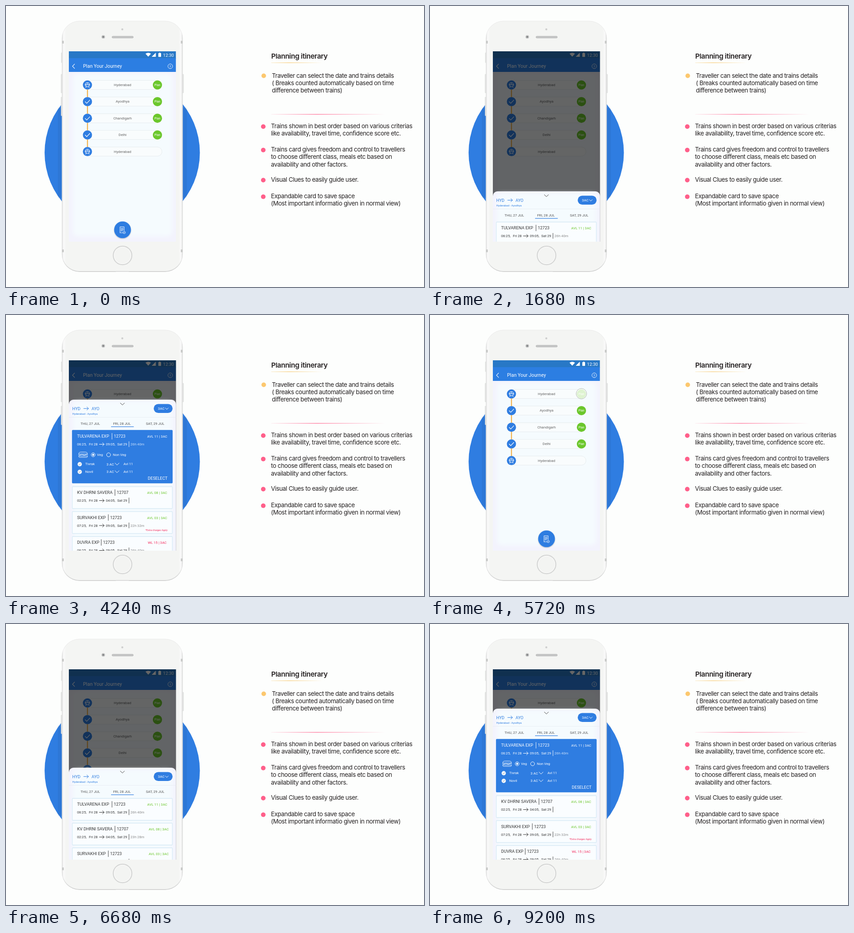
Recreate the animation shown at these times as an HTML page. Size 911x614 px, loop 9920 ms.

```html
<!DOCTYPE html>
<html lang="en">
<head>
<meta charset="utf-8">
<title>Planning itinerary</title>
<style>
html, body { margin: 0; width: 100%; height: 100%; overflow: hidden; background: #fdfefd; }
svg { display: block; width: 911px; height: 614px; font-family: Roboto, sans-serif; }
.copy { font: 13.2px Inter, sans-serif; letter-spacing: -.42px; fill: #231f20; }
.copy .head { font-size: 15.2px; font-weight: 600; letter-spacing: -.35px; }
.line { fill: none; stroke-linecap: round; stroke-linejoin: round; }
#tap1, #tap2, #tap3, #dim, #sheet, #closed, #open, #picked { animation: 4960ms infinite; }
#stage { animation: blink 9920ms step-end infinite; }
#tap1 { animation-name: tap1; }
#tap2 { animation-name: tap2; }
#tap3 { animation-name: tap3; }
#dim { animation-name: dim; }
#sheet { animation-name: sheet; animation-timing-function: step-end; }
#closed { animation-name: closed; animation-timing-function: step-end; }
#open { animation-name: open; animation-timing-function: step-end; }
#picked { animation-name: picked; }
</style>
</head>
<body>
<svg id="stage" viewBox="0 0 911 614"></svg>
<script>
const BLUE = '#2f7de1', INK = '#333', GREEN = '#6bc72b', RED = '#f2295b';

// Keyframes, written in milliseconds of the 4960 ms cycle
const at = ms => (ms / 49.6 - .002).toFixed(3) + '%';
const tap = (name, ms) => `@keyframes ${name} {
  0% { opacity: 0; animation-timing-function: step-end }
  ${at(ms)} { opacity: 1; animation-timing-function: step-end }
  ${at(ms + 200)} { opacity: 1; animation-timing-function: steps(10) }
  ${at(ms + 600)}, 100% { opacity: 0 } }`;
const fade = (name, from, to, n) => `@keyframes ${name} {
  0% { opacity: 0; animation-timing-function: step-end }
  ${at(from)} { opacity: 0; animation-timing-function: steps(${n}) }
  ${at(to)}, 100% { opacity: 1 } }`;
const slide = [220, 129, 80, 49, 28, 14, 6, 2, 0]
  .map((y, i) => `${at(1680 + 40 * i)} { transform: translateY(${y}px) }`).join('');

const style = document.createElement('style');
style.textContent = tap('tap1', 760) + tap('tap2', 2440) + tap('tap3', 3400) +
  fade('dim', 1360, 1520, 4) + fade('picked', 4120, 4240, 3) +
  `@keyframes sheet { 0% { transform: translateY(340px) } ${slide} 100% { transform: none } }
   @keyframes closed { 0% { visibility: visible } ${at(3120)}, 100% { visibility: hidden } }
   @keyframes open { 0% { visibility: hidden } ${at(3120)}, 100% { visibility: visible } }
   @keyframes blink { 0% { opacity: 1 } 49.596% { opacity: 0 } 49.999%, 100% { opacity: 1 } }`;
document.head.append(style);

// Drawing helpers
const text = (x, y, str, size, fill, more = '') =>
  `<text x="${x}" y="${y}" font-size="${size}" fill="${fill}" ${more}>${str}</text>`;
const mid = 'text-anchor="middle"', end = 'text-anchor="end"';
const rect = (x, y, w, h, fill, r = 0, more = '') =>
  `<rect x="${x}" y="${y}" width="${w}" height="${h}" rx="${r}" fill="${fill}" ${more}/>`;
const disc = (x, y, r, fill, more = '') =>
  `<circle cx="${x}" cy="${y}" r="${r}" fill="${fill}" ${more}/>`;
const line = (d, color, w = 1) =>
  `<path class="line" d="${d}" stroke="${color}" stroke-width="${w}"/>`;
const arrow = (x, y, color) => line(`M${x} ${y}h10.5m-3.6-3.4l3.6 3.4l-3.6 3.4`, color);
const chevron = (x, y, w, color) => line(`M${x - w} ${y - w / 2}l${w} ${w}l${w}-${w}`, color);
const touch = (id, x, y) => `<g id="${id}">` +
  disc(x, y, 11.4, '#fff', 'fill-opacity=".78" stroke="#a9b3a6" stroke-width=".9"') + '</g>';
const paper = (y, h, r) => rect(137, y, 233.5, h, '#f3f3fd', r) +
  rect(146, y + 4, 216, h - 16, '#f5fbfe', 10, 'filter="url(#soft)"');

const defs = `<defs>
  <filter id="soft" x="-10%" y="-10%" width="120%" height="120%"><feGaussianBlur stdDeviation="4"/></filter>
  <filter id="drop" x="-50%" y="-50%" width="200%" height="200%"><feDropShadow dx="0" dy="1" stdDeviation="1.2" flood-opacity=".3"/></filter>
  <linearGradient id="shell"><stop stop-color="#d9dad9"/><stop offset=".012" stop-color="#fafafa"/>
    <stop offset=".035" stop-color="#f4f5f3"/><stop offset=".965" stop-color="#f4f5f3"/>
    <stop offset=".988" stop-color="#fafafa"/><stop offset="1" stop-color="#d3d4d3"/></linearGradient>
  <linearGradient id="gold"><stop stop-color="#f7c566" stop-opacity=".3"/><stop offset=".35" stop-color="#f7c566"/><stop offset="1" stop-color="#f7c566" stop-opacity="0"/></linearGradient>
  <linearGradient id="pink"><stop stop-color="#ff5f8a" stop-opacity=".1"/><stop offset=".4" stop-color="#ff5f8a"/><stop offset="1" stop-color="#ff5f8a" stop-opacity="0"/></linearGradient>
  <clipPath id="screen"><rect x="137" y="99" width="233.5" height="416"/></clipPath>
</defs>`;

function phone() {
  const keys = [[120.5, 102, 22], [120, 149, 41], [120, 199, 41], [384, 149, 41]]
    .map(([x, y, h]) => rect(x, y, 3, h, '#e3e4e3', 1, 'stroke="#cfd0cf" stroke-width=".5"')).join('');
  const bands = [76, 532].map(y => rect(122, y, 4, 6, '#c9cac9') + rect(381, y, 4, 6, '#c9cac9')).join('');
  return disc(253.3, 320.5, 169.2, BLUE) +
    rect(113, 222, 9, 197, '#000', 0, 'opacity=".05"') + rect(385, 222, 9, 197, '#000', 0, 'opacity=".05"') +
    keys + rect(122, 34.5, 263, 546.5, '#c8c9c8', 38) +
    rect(122, 33, 263, 546.5, 'url(#shell)', 38, 'stroke="#e2e3e2" stroke-width=".7"') + bands +
    rect(239, 579, 29, 2, '#dcdcdc', 1) +
    disc(253.5, 51, 2.2, '#cfcfcf') + disc(212, 67.5, 3.8, '#bfc0c0') + disc(212, 67.5, 1.8, '#77797a') +
    rect(231, 66, 46.5, 4, '#c6c7c7', 2, 'stroke="#a9aaaa" stroke-width=".7"') +
    disc(254, 545, 20.3, '#f7f7f6', 'stroke="#d3d4d3" stroke-width="2"') +
    disc(254, 545, 17.5, '#f3f4f2');
}

function bar() {
  return rect(137, 99, 233.5, 16, '#2878c6') + rect(137, 114, 233.5, 30, '#2c7ee2') +
    `<path fill="#fff" d="M304 104.3q6-4 12 0l-6 6.5zM317.5 111h9v-9z"/>` +
    rect(332, 103, 6, 8.2, '#fff', .8) + rect(333.6, 102, 2.8, 2, '#fff') +
    text(342.3, 110.5, '12:30', 9.5, '#fff') +
    line('M149.5 126.8l-4.6 4.8l4.6 4.8', '#fff', 1.1) +
    text(168, 135.2, 'Plan Your Journey', 10.5, '#fff') +
    disc(358, 131.7, 5.1, 'none', 'stroke="#fff" stroke-width=".9"') +
    text(358, 134.6, '?', 8, '#fff', mid);
}

const train = y => line(`M174 ${y + 3}v-6q0-2 2-2h3q2 0 2 2v6q0 1-1 1h-5q-1 0-1-1zM174 ${y - 1}h7M177.5 ${y - 5}v4M175.7 ${y + 1.6}h.3M179 ${y + 1.6}h.3M172.6 ${y - 2}v3M182.4 ${y - 2}v3M175 ${y + 4}l-1.6 2M180 ${y + 4}l1.6 2`, '#fff', .9);

function home() {
  const stops = ['Hyderabad', 'Ayodhya', 'Chandigarh', 'Delhi', 'Hyderabad'];
  const rows = stops.map((name, i) => {
    const y = 172.5 + 36.4 * i, terminal = i % 4 === 0;
    return rect(168, y - 10, 172, 20, '#f9fcfd', 10, 'stroke="#e6ebee" stroke-width=".9"') +
      disc(177.5, y, 10, BLUE) +
      (terminal ? train(y) : line(`M172.6 ${y + .3}l3.4 3.5l6.6-7`, '#fff', 1.2)) +
      text(254, y + 2.5, name, 7.9, '#666', mid) +
      (i < 4 ? disc(330, y, 10, GREEN) + text(330, y + 2.2, 'Plan', 6.5, '#fff', mid) : '');
  }).join('');
  return paper(144, 371, 0) + bar() + rows +
    [0, 1, 2, 3].map(i => rect(176.6, 182.5 + 36.4 * i, 1.9, 16.4, '#f0a62f')).join('') +
    disc(254, 489, 18.3, BLUE, 'filter="url(#drop)"') +
    line('M257.5 491v-8.500h-9v13.500l1.500-1l1.500 1l1.500-1l1.500 1M251 485v7M253 485v7M255 485v5', '#fff', .9) +
    disc(257.7, 495, 2.5, BLUE, 'stroke="#fff" stroke-width=".8"') + line('M256.700 495l.8.8l1.400-1.500', '#fff', .7);
}

// One train: name, bar position, number, departure, arrival, duration, status, status end
const trains = [
  ['TULVARENA EXP', 231, '12723', '06:25,', '09:05,', '26h 40m', 'AVL 11 | 3AC', 351.5],
  ['KV DHRNI SAVERA', 237.5, '12707', '02:25,', '04:05,', '23h 28m', 'AVL 08 | 3AC', 354.7],
  ['SURVAKHI EXP', 223, '12723', '07:25,', '09:05,', '22h 32m', 'AVL 03 | 3AC', 354.7],
  ['DUVRA EXP', 207.500, '12723', '06:25,', '09:05,', '26h 40m', 'WL 15 | 3AC', 352],
  ['TULVARENA EXP', 231, '12723', '06:25,', '09:05,', '26h 40m', 'WL 30 | 3AC', 352],
];
const extra = (x, y) => text(x, y, '*Extra charges Apply', 5.2, RED, end);

function card([name, barX, num, dep, arr, span, status, right], y, h = 48, ink = INK, dx = 0) {
  const white = ink === '#fff', tint = white ? ink : status[0] === 'A' ? GREEN : RED;
  return rect(144.5, y, 218, h, white ? BLUE : '#fafdff', 1, `stroke="${white ? BLUE : '#d8eaf5'}" stroke-width="1.3"`) +
    `<g transform="translate(${dx} 0)">` +
    text(155, y + 16, name, 9.2, ink) + line(`M${barX} ${y + 6.500}v13`, ink, .9) +
    text(barX + 4, y + 16, num, 9, ink) +
    text(155, y + 33, dep, 7.6, ink) + text(180.8, y + 33, 'Fri 28', 7.6, ink) +
    arrow(203.5, y + 30.5, ink) +
    text(217.7, y + 33, arr, 7.6, ink) + text(242.5, y + 33, 'Sat 29', 7.6, ink) +
    line(`M268 ${y + 24.5}v11.500`, ink, .9) + text(271.3, y + 33, span, 7.700, white ? '#c9dffa' : '#8a8a8a') +
    '</g>' + text(right, y + 16, status, 7.6, tint, end);
}

function fullCard(ink) {
  const white = ink === '#fff';
  const people = ['Tivrak', 'Novil'].map((name, i) => {
    const y = 326 + 16.7 * i;
    return disc(160.7, y, 4.700, white ? '#f4f7fb' : '#dfe8f1') +
      line(`M158.700 ${y}l1.500 1.600l2.700-3`, '#7b8fa8', .8) +
      text(172.8, y + 2.4, name, 7.6, ink) + text(219, y + 2.6, '3 AC', 7.8, ink) +
      chevron(242, y - .3, 4.4, ink) + text(256, y + 1.8, 'Avl 11', 7.6, ink);
  }).join('');
  return card(trains[0], 252, 115, ink) +
    line('M158.500 303.500q0-4 5-4h9q5 0 5 4zM158 305.500q2.500 2 5 0t5 0t5 0t5 0M158.500 308h19v1q0 2-2 2h-15q-2 0-2-2z', ink, .9) +
    disc(190, 305.5, 4.300, 'none', `stroke="${ink}"`) + disc(190, 305.5, 2.200, ink) +
    text(198.3, 308, 'Veg', 7.6, ink) +
    disc(223.6, 305.5, 4.300, 'none', `stroke="${ink}"`) + text(233, 308, 'Non Veg', 7.6, ink) +
    people + text(352, 359.8, white ? 'DESELECT' : 'SELECT', 9.1, white ? ink : BLUE, end);
}

function sheet() {
  const closed = trains.map((t, i) => card(t, [252, 306, 360, 414, 469][i], 48, INK, i === 4 ? 2 : 0)).join('') +
    extra(355, 403.700) + extra(352, 472);
  const open = fullCard(INK) + trains.slice(1, 4).map((t, i) => {
    const row = [...t];
    row[7] = i < 2 ? 351.3 : 350;
    if (!i) row[5] = '';
    return card(row, [375, 429.500, 484][i]);
  }).join('') + extra(352, 472);
  return paper(185, 345, 10) + chevron(253.7, 194.500, 4.500, '#444') +
    text(144.6, 207.5, 'HYD', 9, BLUE) + arrow(169.3, 204.3, BLUE) + text(186.5, 207.5, 'AYO', 9, BLUE) +
    text(144.5, 217.8, 'Hyderabad - Ayodhya', 5.9, BLUE) +
    rect(322, 194.5, 41, 19.500, BLUE, 9.7) + text(331, 207.2, '3AC', 7.8, '#fff') + chevron(350.5, 204.6, 3.200, '#fff') +
    rect(137, 223, 233.5, .8, '#e6ebf2') +
    text(183.7, 239.500, 'THU, 27 JUL', 7.7, '#555', mid) + text(252.6, 239.500, 'FRI, 28 JUL', 7.7, '#555', mid) +
    text(325, 239.500, 'SAT, 29 JUL', 7.7, '#555', mid) + rect(229, 243.500, 49.500, 1.2, BLUE) +
    `<g id="closed">${closed}</g><g id="open">${open}<g id="picked">${fullCard('#fff')}</g></g>` +
    touch('tap2', 280, 281.5) + touch('tap3', 332.5, 357);
}

function copy() {
  const notes = [
    [266.7, 'Trains shown in best order based on various criterias', 'like availability, travel time, confidence score etc.'],
    [318, 'Trains card gives freedom and control to travellers', 'to choose different class, meals etc based on', 'availability and other factors.'],
    [383.7, 'Visual Clues to easily guide user.'],
    [420, 'Expandable card to save space', '(Most important informatio given in normal view)'],
  ];
  const block = (x, y, lines) => lines.map((s, i) => `<text x="${x}" y="${y + 16.4 * i}">${s}</text>`).join('');
  return '<g class="copy"><text class="head" x="578" y="115.3">Planning itinerary</text>' +
    rect(578, 123.4, 112, 1.1, 'url(#gold)') + disc(561.7, 152.5, 5, '#fcc86f') +
    block(579.5, 156.6, ['Traveller can select the date and trains details', '( Breaks counted automatically based on time', 'difference between trains)']) +
    rect(578, 236.1, 249, 1.1, 'url(#pink)') +
    notes.map(([y, ...lines]) => disc(560.7, y - 3.2, 5, '#ff5f8a') + block(577.500, y, lines)).join('') + '</g>';
}

document.getElementById('stage').innerHTML = defs + phone() +
  `<g clip-path="url(#screen)">${home()}${touch('tap1', 330, 172)}` +
  rect(137, 99, 233.5, 416, '#000', 0, 'id="dim" fill-opacity=".6"') +
  `<g id="sheet">${sheet()}</g></g>` + copy();
</script>
</body>
</html>
```
